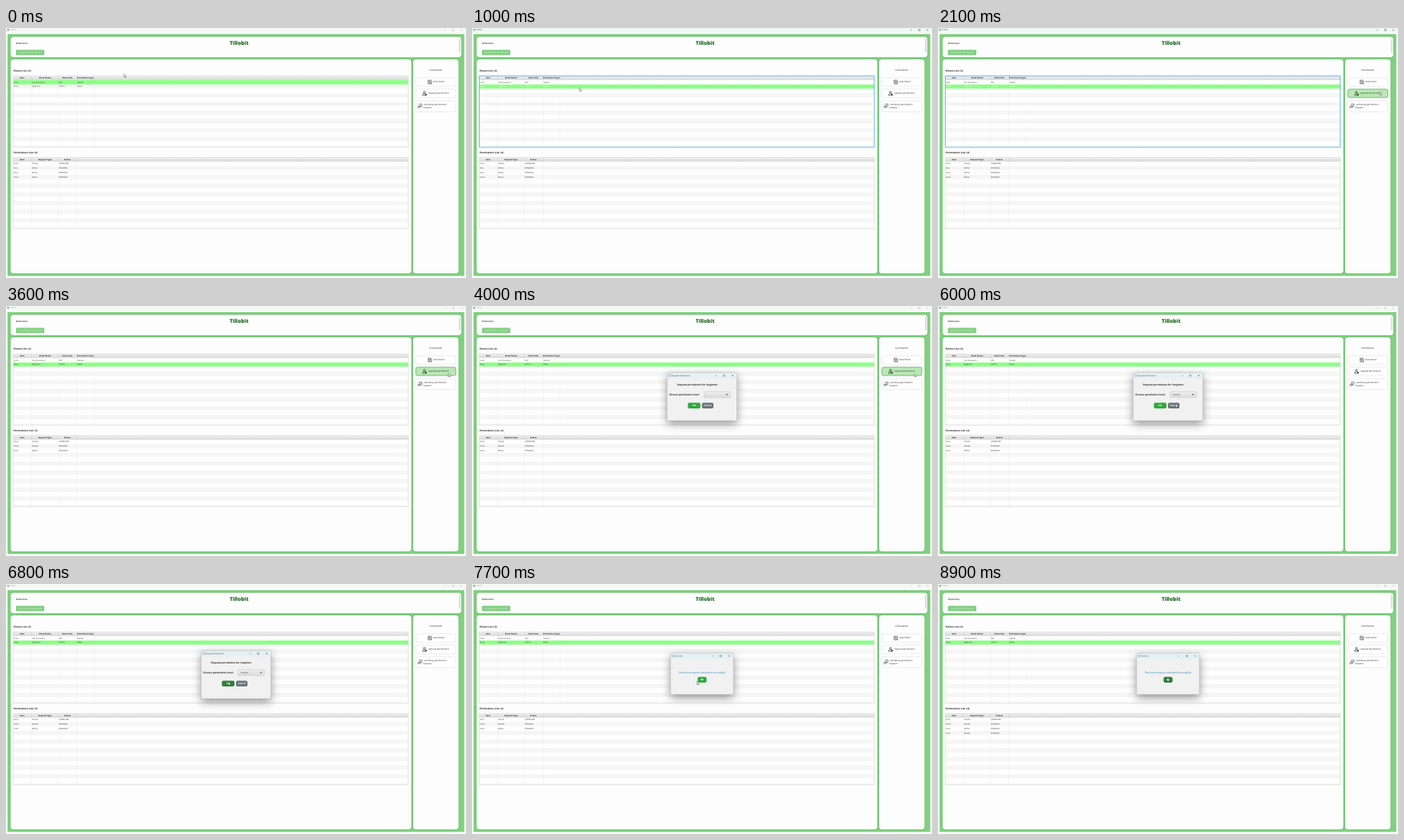
An HTML page with a canvas for the animation above (9 s loop, 600 by 327 pixels).

```html
<!DOCTYPE html>
<html lang="en">
<head>
<meta charset="utf-8">
<title>Sheet permissions</title>
<style>
html, body { margin: 0; width: 100%; height: 100%; overflow: hidden; background: #fff; }
canvas { display: block; width: 600px; height: 327px; }
</style>
</head>
<body>
<canvas id="stage"></canvas>
<script>
const LOOP = 9000, STEP = 100;
const canvas = document.getElementById('stage');
const ratio = window.devicePixelRatio || 1;
canvas.width = 600 * ratio;
canvas.height = 327 * ratio;
const ctx = canvas.getContext('2d');
ctx.scale(ratio, ratio);
ctx.textBaseline = 'middle';
ctx.textRendering = 'geometricPrecision';

const GREEN = '#81d081', INK = '#222', SELECTED = '#8cff86';
const APP = 'Tillobit', USER = 'mira', OTHER = 'dory';

// Cursor stops: time, x, y
const path = [
  [0, 154, 60], [300, 153, 62], [800, 140, 78], [1100, 140, 78], [1400, 330, 94],
  [1800, 560, 92], [2000, 576, 83], [2900, 576, 83], [3400, 577, 88], [4000, 577, 88],
  [4400, 430, 112], [4800, 326, 115], [5000, 326, 115], [5100, 310, 120],
  [5500, 310, 128], [6000, 310, 128], [6500, 290, 128], [7500, 290, 128],
  [8300, 312, 122], [8600, 299, 123], [9000, 299, 123]
];

function cursorAt(t) {
  const i = path.findIndex(p => p[0] > t);
  const [t0, x0, y0] = path[i - 1], [t1, x1, y1] = path[i];
  let k = (t - t0) / (t1 - t0);
  k = k * k * (3 - 2 * k);
  return [x0 + (x1 - x0) * k, y0 + (y1 - y0) * k];
}

function rect(x, y, w, h, fill) {
  ctx.fillStyle = fill;
  ctx.fillRect(x, y, w, h);
}

function box(x, y, w, h, r, fill, stroke, width = 0.5) {
  ctx.beginPath();
  ctx.roundRect(x, y, w, h, r);
  if (fill) { ctx.fillStyle = fill; ctx.fill(); }
  if (stroke) { ctx.strokeStyle = stroke; ctx.lineWidth = width; ctx.stroke(); }
}

function text(s, x, y, size, color = INK, style = '400', align = 'left') {
  ctx.font = `${style} ${size}px "Open Sans", sans-serif`;
  ctx.fillStyle = color;
  ctx.textAlign = align;
  ctx.fillText(s, x, y);
}

function line(points, color, width = 0.5) {
  ctx.beginPath();
  points.forEach(([x, y]) => ctx.lineTo(x, y));
  ctx.strokeStyle = color;
  ctx.lineWidth = width;
  ctx.stroke();
}

function vertical(y, h, top, bottom) {
  const g = ctx.createLinearGradient(0, y, 0, y + h);
  g.addColorStop(0, top);
  g.addColorStop(1, bottom);
  return g;
}

function windowControls(xs, y, color) {
  const [a, b, c] = xs;
  line([[a - 1, y], [a + 1, y]], color, 0.4);
  box(b - 1, y - 1, 2, 2, 0.3, null, color, 0.4);
  line([[c - 1, y - 1], [c + 1, y + 1]], color, 0.4);
  line([[c - 1, y + 1], [c + 1, y - 1]], color, 0.4);
}

function table({ y, bottom, columns, edges, rows, selected = -1, focused }) {
  const left = 9.5, right = 524.7, rowH = 5.7, first = y + 5.5;
  rect(left, y, right - left, bottom - y, '#fefefe');
  rect(left, y, right - left, 5.5, vertical(y, 5.5, '#f0f0f0', '#d8d8d8'));
  for (let i = 0, top = first; top < bottom; i++, top += rowH) {
    const fill = i === selected ? SELECTED : i % 2 ? '#f6f6f6' : '#fefefe';
    rect(left, top, right - left, Math.min(rowH, bottom - top), fill);
  }
  edges.forEach(x => {
    rect(x, y, 0.4, 5.5, '#c4c4c4');
    rect(x, first, 0.4, bottom - first, 'rgba(90,90,90,.12)');
  });
  columns.forEach(([name, x]) => text(name, x, y + 2.9, 2.65, '#2c2c2c', '700', 'center'));
  rows.forEach((row, i) => row.forEach((cell, j) =>
    text(cell, [10.5, ...edges][j] + (j ? 1 : 0), first + rowH * (i + 0.5), 2.6,
      focused && i === selected ? '#fff' : '#333')));
  box(left, y, right - left, bottom - y, 0, null, focused ? '#3fb0e2' : '#cfcfcf', focused ? 0.8 : 0.5);
}

function person(x, y) {
  ctx.strokeStyle = '#222';
  ctx.lineWidth = 0.6;
  ctx.beginPath();
  ctx.arc(x, y - 1.3, 1.3, 0, 7);
  ctx.stroke();
  ctx.beginPath();
  ctx.arc(x, y + 2.7, 2.5, Math.PI, 0);
  ctx.closePath();
  ctx.stroke();
  box(x + 0.8, y + 0.8, 2.1, 1.9, 0.4, '#333');
}

function sheetIcon(x, y) {
  box(x - 2.4, y - 2.5, 4.4, 5, 0.4, null, '#333', 0.5);
  line([[x - 2.4, y - 0.8], [x + 2, y - 0.8]], '#333', 0.4);
  line([[x - 0.9, y - 2.5], [x - 0.9, y + 2.5]], '#333', 0.4);
  box(x - 0.4, y - 0.4, 2.4, 2.4, 1.2, '#fff', '#222', 0.5);
  line([[x + 1.7, y + 1.7], [x + 2.8, y + 2.8]], '#222', 0.6);
}

function replyIcon(x, y) {
  box(x - 1, y - 2.8, 3.8, 3.4, 0.5, null, '#333', 0.5);
  line([[x - 0.2, y - 1.2], [x + 0.7, y - 0.4], [x + 2, y - 2]], '#333', 0.5);
  line([[x - 2.8, y + 0.5], [x - 1.3, y + 0.5], [x + 1, y + 1.6], [x - 2.6, y + 2.6], [x - 2.8, y + 0.5]], '#333', 0.5);
}

function commandButton(y, h, hover) {
  box(534.7, y, 52, h, 2, hover ? '#b9e8b4' : '#fff', hover ? '#55a455' : '#d9d9d9', hover ? 0.7 : 0.5);
}

function mainWindow(t) {
  const active = t >= 800 && t < 3100;
  const focused = active;
  rect(0, 0, 600, 327, '#fbfcfb');
  rect(0, 0, 600, 6, active ? '#f1f7f1' : '#f6f8f6');
  box(1.6, 1.3, 2.3, 2.3, 0.2, '#69b56d');
  text(APP, 5, 2.6, 2.5, active ? '#333' : '#909090');
  windowControls([573, 583.5, 594], 2.6, active ? '#222' : '#a5a5a5');

  rect(2, 8, 595.8, 316.3, GREEN);
  ctx.save();
  ctx.shadowColor = 'rgba(0,70,0,.3)';
  ctx.shadowBlur = 2 * ratio;
  box(6, 11.5, 588, 26.7, 4, '#fdfdfd');
  box(6, 41, 522.7, 280, 4, '#fdfdfd');
  box(531, 41, 59.3, 280, 4, '#fdfdfd');
  ctx.restore();
  box(590.8, 14, 2.5, 18, 1, '#dedede');

  text('Hello ' + USER, 13, 20.3, 3, INK, '600');
  text(APP, 304, 20.3, 6.8, '#1d701f', '800', 'center');
  box(13, 28.5, 37, 7, 1.2, GREEN);
  text('Load Sheet File Button', 31.5, 32, 3, '#e2f6e2', '400', 'center');

  text('Sheets List: (2)', 9.7, 56.5, 3.2, INK, '700');
  table({
    y: 62.7, bottom: 156, edges: [33, 68, 92, 114.7], focused,
    columns: [['User', 21], ['Sheet Name', 51], ['Sheet Size', 80], ['Permission Type', 103.5]],
    rows: [[USER, 'Car Insurance', '9X7', 'Owner'], [OTHER, 'beginner', '10X10', 'None']],
    selected: t < 800 ? 0 : 1
  });

  let requests = [[USER, 'Owner', 'APPROVED'], ['Ben', 'Writer', 'PENDING'],
    [OTHER, 'Writer', 'PENDING'], ['Peter', 'Writer', 'PENDING']];
  if (t >= 2500) {
    requests = [[OTHER, 'Owner', 'APPROVED'], ['Peter', 'Reader', 'PENDING'], [USER, 'Writer', 'PENDING']];
    if (t >= 8400) requests.push([USER, 'Reader', 'PENDING']);
  }
  text(`Permissions List: (${requests.length})`, 9.7, 163.3, 3.2, INK, '700');
  table({
    y: 169.4, bottom: 262.5, edges: [33, 68, 92], rows: requests,
    columns: [['User', 21], ['Request Type', 51], ['Status', 80]]
  });

  text('Commands', 560.5, 55.5, 3.1, INK, '400', 'center');
  commandButton(65.2, 10.8);
  sheetIcon(552.8, 70.6);
  text('view sheet', 557, 70.6, 3);
  commandButton(80, 11, t >= 1900 && t < 4100);
  person(545.8, 85.4);
  text('request permission', 550.5, 85.5, 3);
  commandButton(95.3, 14.2);
  replyIcon(540, 102);
  text('ack\\deny permission', 545.5, 100.2, 3);
  text('request', 544, 104.5, 3);
}

function dialogFrame(x, y, w, h, title, controls) {
  ctx.save();
  ctx.shadowColor = 'rgba(0,0,0,.42)';
  ctx.shadowBlur = 12 * ratio;
  ctx.shadowOffsetY = 4 * ratio;
  box(x, y, w, h, 1, '#f1f1f1');
  ctx.restore();
  box(x, y, w, 7.5, [1, 1, 0, 0], '#e4f1f5');
  box(x, y, w, h, 1, null, '#aaa', 0.4);
  box(x + 2.2, y + 2.3, 2.4, 2.6, 0.2, '#fff', '#557', 0.4);
  text(title, x + 6, y + 3.7, 2.55, '#333');
  windowControls(controls, y + 3.7, '#333');
}

function pill(x, y, w, h, label, fill) {
  box(x, y, w, h, 2, fill);
  text(label, x + w / 2, y + h / 2, 3, '#fff', '700', 'center');
}

function requestDialog(t) {
  const open = t >= 5000 && t < 6000;
  dialogFrame(254.5, 87.3, 91, 62.7, 'Request Permission', [318.5, 329, 340]);
  text('Request permission for: beginner', 294, 102.7, 3.2, INK, '700', 'center');
  text('Choose permission level:', 257.3, 115.8, 3.2, INK, '700');
  box(302.8, 111.8, 34.2, 8, 0.8, vertical(111.8, 8, '#ededed', '#dcdcdc'),
    open ? '#4aa9d8' : '#c2c2c2', 0.5);
  ctx.fillStyle = '#444';
  ctx.beginPath();
  ctx.moveTo(331.2, 115.2);
  ctx.lineTo(333.8, 115.2);
  ctx.lineTo(332.5, 116.9);
  ctx.fill();
  if (t >= 6000) text('READER', 306, 115.8, 2.7, '#555');
  pill(281.5, 126.5, 16.5, 7.6, 'OK', t >= 6400 ? '#2c8138' : '#2faa3e');
  pill(300, 126.5, 15, 7.6, 'Cancel', '#6b737b');
  if (open) {
    const hovered = t < 5400 ? 0 : 1;
    ctx.save();
    ctx.shadowColor = 'rgba(0,0,0,.35)';
    ctx.shadowBlur = 3 * ratio;
    box(302.8, 120.3, 34.2, 12.5, 0.4, '#fff', '#b5b5b5', 0.4);
    ctx.restore();
    rect(303.2, 120.6 + hovered * 6, 33.4, 6, '#d9edf7');
    text('WRITER', 305, 123.6, 2.7, '#444');
    text('READER', 305, 129.5, 2.7, '#444');
  }
}

function successDialog(t) {
  dialogFrame(259, 90.5, 82, 54, 'Success', [314, 324.5, 335.5]);
  text('Permission request submitted successfully', 300, 116, 3.3, '#2383b3', 'italic 400', 'center');
  pill(294.3, 121.4, 11.6, 7.6, 'OK', t >= 8500 ? '#2c8138' : '#2faa3e');
}

function pointer([x, y]) {
  ctx.beginPath();
  [[0, 0], [0, 4.4], [1, 3.5], [1.7, 5], [2.4, 4.7], [1.8, 3.3], [3.1, 3.2]]
    .forEach(([dx, dy]) => ctx.lineTo(x + dx, y + dy));
  ctx.closePath();
  ctx.fillStyle = '#fff';
  ctx.fill();
  ctx.strokeStyle = '#333';
  ctx.lineWidth = 0.4;
  ctx.stroke();
}

function draw() {
  const now = performance.now() % LOOP;
  const t = now - now % STEP;
  mainWindow(t);
  if (t >= 3800 && t < 7400) requestDialog(t);
  if (t >= 7600) successDialog(t);
  pointer(cursorAt(t));
  requestAnimationFrame(draw);
}
draw();
</script>
</body>
</html>
```
